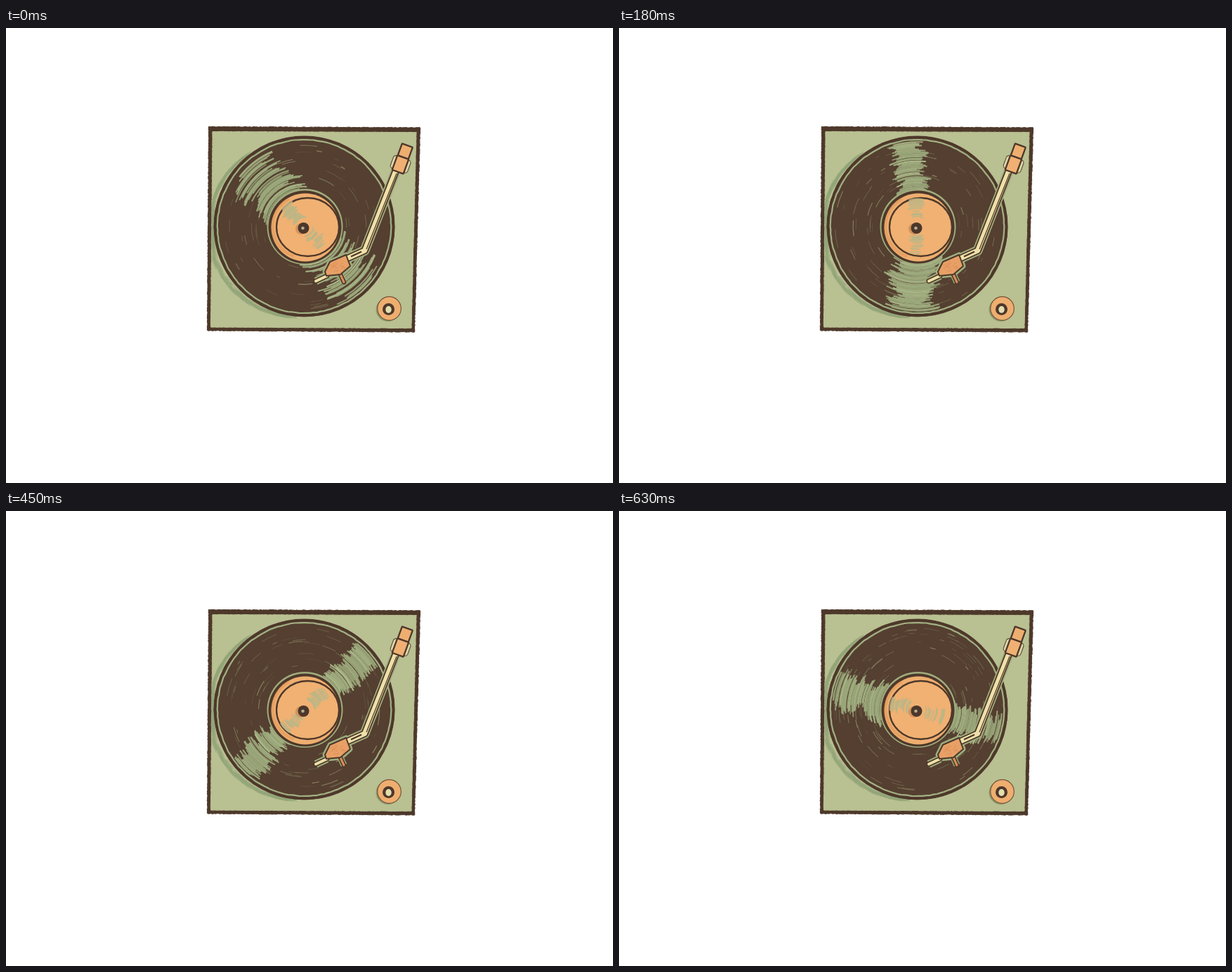
Recreate the animation shown at these times as an HTML page with a canvas. Size 864 px wide and 648 px high, loop 0.72 s.

```html
<!DOCTYPE html>
<html lang="en">
<head>
<meta charset="utf-8">
<title>Turntable</title>
<style>
html, body { margin: 0; width: 100%; height: 100%; overflow: hidden; background: #fff; }
canvas { display: block; }
</style>
</head>
<body>
<canvas id="stage" width="864" height="648"></canvas>
<script>
const ctx = document.getElementById('stage').getContext('2d');
const STEP = 90, STEPS = 8;
const DARK = '#543f30', LINE = '#4d382a', DECK = '#b9c092', SHADE = '#92a578',
  SHINE = '#9fae7f', PALE = '#aebb8b', ORANGE = '#eeae70', CREAM = '#eee0a8';
const CX = 424.5, CY = 282.5;

let seed = 1;
function rnd(a = 0, b = 1) {
  seed = (seed * 16807) % 2147483647;
  return a + (b - a) * seed / 2147483647;
}
const rad = deg => (deg - 90) * Math.PI / 180;

function paint(fill, stroke, width = 2) {
  if (fill) { ctx.fillStyle = fill; ctx.fill(); }
  if (stroke) { ctx.strokeStyle = stroke; ctx.lineWidth = width; ctx.stroke(); }
}
function path(points, closed) {
  ctx.beginPath();
  points.forEach(([x, y]) => ctx.lineTo(x, y));
  if (closed) ctx.closePath();
}
function poly(points, fill, stroke, width) {
  path(points, true);
  paint(fill, stroke, width);
}
function line(points, color, width) {
  path(points);
  paint(null, color, width);
}
function oval(x, y, rx, ry, fill, stroke, width) {
  ctx.beginPath();
  ctx.ellipse(x, y, rx, ry, 0, 0, 7);
  paint(fill, stroke, width);
}
const disc = (x, y, r, ...style) => oval(x, y, r, r, ...style);
function box(x, y, w, h, r, ...style) {
  ctx.beginPath();
  ctx.roundRect(x, y, w, h, r);
  paint(...style);
}
function arc(r, from, to, color, width) {
  ctx.beginPath();
  ctx.arc(CX, CY, r, from, to);
  paint(null, color, width);
}

// Polygon whose edges are frayed like a dry brush
function rough(corners, fill, amount) {
  const pts = [];
  corners.forEach(([x, y], i) => {
    const [u, v] = corners[(i + 1) % corners.length];
    const n = Math.round(Math.hypot(u - x, v - y) / 2);
    for (let k = 0; k < n; k++)
      pts.push([x + (u - x) * k / n + rnd(-amount, amount),
                y + (v - y) * k / n + rnd(-amount, amount)]);
  });
  poly(pts, fill, fill, 1);
}

function roughRing(r, color, width, wobble) {
  const pts = [];
  for (let i = 0; i < 150; i++) {
    const a = i / 150 * Math.PI * 2, q = r + rnd(-wobble, wobble);
    pts.push([CX + q * Math.cos(a), CY + q * Math.sin(a)]);
  }
  poly(pts, null, color, width);
}

function drawDeck() {
  rough([[288.5, 140.5], [589.5, 142], [581.5, 433], [286.5, 431]], LINE, .4);
  rough([[294, 147.5], [584, 148.5], [577, 427.5], [291.5, 426]], DECK, .25);
  for (let i = 0; i < 150; i++) {
    const t = i / 150, a = rad(188 + 134 * t);
    const room = (CX - 293) / Math.max(.1, -Math.cos(a)) - 2;
    const r = Math.min(130 + 9 * Math.sin(t * Math.PI) * rnd(.3, 1), room);
    ctx.globalAlpha = rnd(.2, .6);
    arc(r, a - .06, a + .06, SHADE, rnd(2, 5));
  }
  ctx.globalAlpha = 1;
}

function drawDisc() {
  disc(CX, CY, 129, DARK);
  roughRing(123.5, '#a3b083', 2.2, .4);
  roughRing(127, LINE, 3, .4);
}

function drawGrooves(count) {
  for (let i = 0; i < count; i++) {
    const r = Math.sqrt(rnd(58 * 58, 118 * 118)), a = rnd(0, 6.28);
    ctx.globalAlpha = rnd(.2, .85);
    arc(r, a, a + rnd(5, 26) / r, rnd() < .5 ? '#7f7c5b' : '#958f6c', rnd(.5, 1.5));
  }
  ctx.globalAlpha = 1;
}

// A band of side-to-side brush strokes whose two ends wander independently
function drawShine(deg, half, inner, outer, density, colors) {
  const mid = rad(deg);
  let left = half, right = half;
  for (let r = inner; r < outer; r += 1.3) {
    left += (half * rnd(.1, 1.9) - left) * .45;
    right += (half * rnd(.1, 1.9) - right) * .45;
    if (rnd() > density) continue;
    ctx.globalAlpha = rnd(.75, 1);
    arc(r, mid - left / r, mid + right / r, colors[rnd() < .8 ? 0 : 1], rnd(1.3, 2.4));
  }
  ctx.globalAlpha = 1;
}

function drawLabel(up, down) {
  disc(425.5, 283, 54, '#a1ad7e');
  disc(425.5, 283.5, 52, LINE);
  disc(426, 284, 48.5, ORANGE);
  ctx.globalAlpha = .4;
  arc(45, 1.9, 4.2, '#d98c4f', 4);
  ctx.globalAlpha = 1;
  oval(429.5, 283.5, 44.5, 41.5, '#f0b173', LINE, 2.3);
  const tint = ['#b9b687', '#cbb67f'];
  drawShine(up, 9, 13, 39, .7, tint);
  drawShine(down, 9, 13, 39, .7, tint);
  disc(420, 286, 8, '#d5935a');
  disc(423.5, 285, 8, '#4b372c');
  disc(422.5, 285, 2.3, '#b5ac8c');
}

function drawArm() {
  const rod = [[555, 203], [510.5, 317], [486, 328]];
  const head = [[461, 333], [484, 323], [490, 339], [476, 351], [456, 353], [454, 347]];
  const needle = [[457, 353], [441, 360.5]];
  const lever = [[475, 349], [481, 362]];
  ctx.lineJoin = 'round';
  line(rod, '#a2ad7e', 14);
  poly(head, SHINE, SHINE, 7);
  line(needle, SHINE, 11);
  line(lever, SHINE, 9);

  line(rod, LINE, 10.5);
  line(rod, CREAM, 7);
  line([[556, 207], [513, 315]], LINE, 1.2);
  line([[491, 325.5], [506, 318.5]], LINE, 2.2);

  ctx.lineCap = 'round';
  line(needle, LINE, 7);
  line(needle, CREAM, 4);
  line(lever, LINE, 6.5);
  line(lever, '#d88e58', 3);
  ctx.lineCap = 'butt';
  poly(head, '#e8a066', LINE, 2);
  for (let i = 0; i < 22; i++) {
    const x = rnd(461, 481), y = rnd(334, 347);
    line([[x, y], [x + 3, y - 1.5]], '#d98b55', .8);
  }

  // Counterweight
  ctx.save();
  ctx.translate(564.5, 186);
  ctx.rotate(.35);
  box(-13, -1, 26, 19, 4, '#dcd9aa', '#625039', 1.2);
  box(-8, -20, 16, 18, 1, ORANGE, LINE, 2.3);
  box(-8.5, -2, 17, 22, 1, '#f0b073', LINE, 2.3);
  ctx.restore();
}

function drawKnob() {
  disc(543.5, 401, 17, '#8a9a6d');
  disc(545.5, 399.5, 16.8, ORANGE, '#765438', 1.2);
  disc(544.5, 400.5, 8.5, LINE);
  oval(544.5, 401, 4.2, 5, '#e3deb0');
}

function draw(step) {
  const t = step / STEPS, first = Math.exp(-2 * step);
  // Half a turn per loop, lagging behind an even spin and catching up at the end
  const up = -42 + 180 * t - 22 * Math.sin(Math.PI * t ** 1.4);
  const down = up + 180 + 12 * (1 - t) * Math.sin(2 * Math.PI * t);
  const upHalf = 19 + 12 * first;
  const downHalf = 26 + 7 * Math.cos(Math.PI * step / 5);
  const density = .95 - .25 * first;

  ctx.fillStyle = '#fff';
  ctx.fillRect(0, 0, 864, 648);
  seed = 4711;
  drawDeck();
  drawDisc();
  seed = 9001 + step * 7919;
  drawGrooves(110 - 50 * Math.exp(-step / 2));
  drawShine(up, upHalf, 54, 121, density, [SHINE, PALE]);
  drawShine(down, downHalf, 54, 121, density, [SHINE, PALE]);
  drawLabel(up, down);
  seed = 1234;
  drawArm();
  drawKnob();
}

let shown = -1;
function tick(now) {
  const step = Math.floor(now / STEP) % STEPS;
  if (step !== shown) draw(shown = step);
  requestAnimationFrame(tick);
}
draw(shown = 0);
requestAnimationFrame(tick);
</script>
</body>
</html>
```
